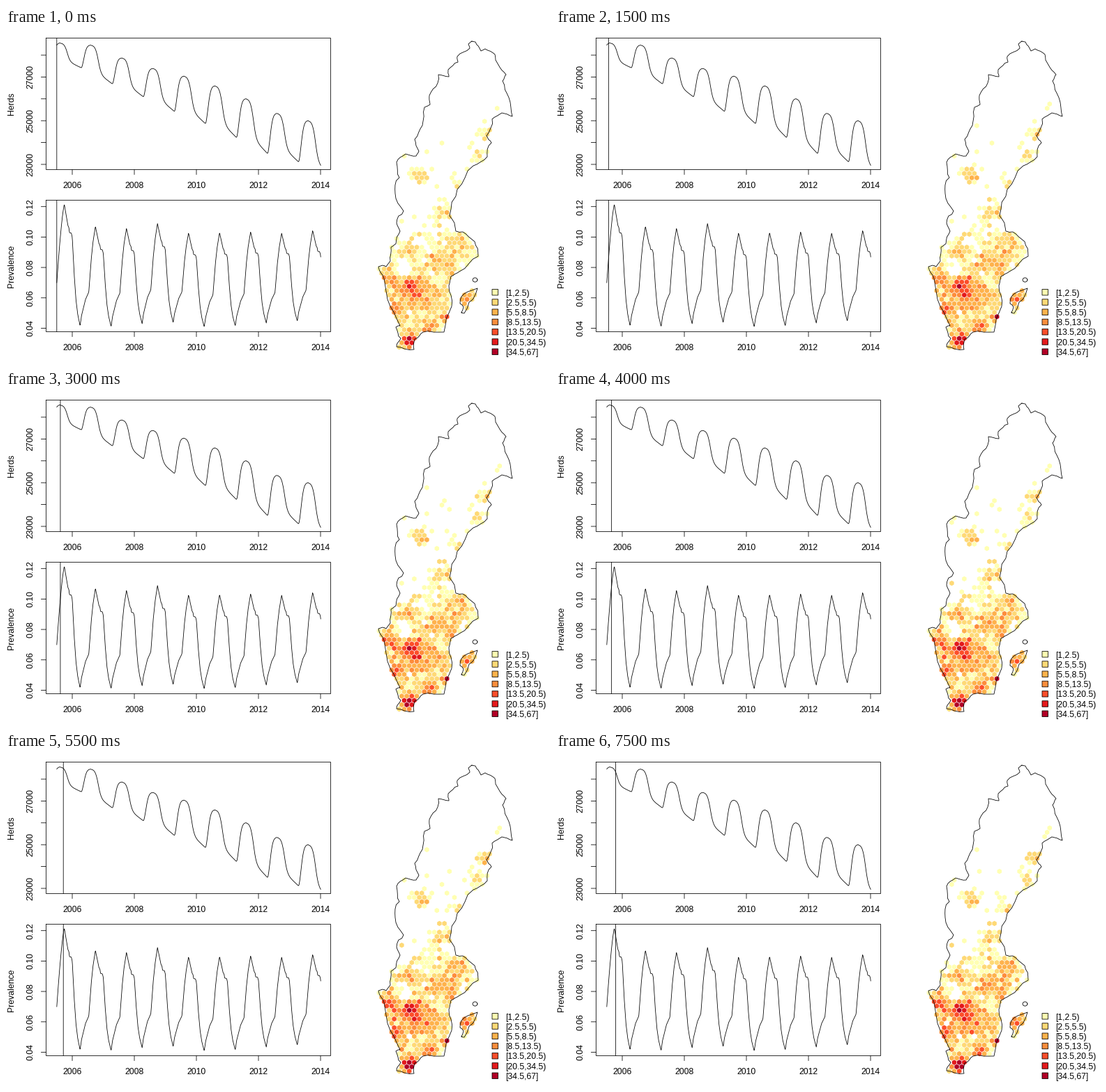
Recreate the animation shown at these times as a matplotlib script. Size 780 by 480 pixels, loop 8000 ms.

```python
import numpy as np
import matplotlib.pyplot as plt
from matplotlib.animation import FuncAnimation
from matplotlib.collections import PolyCollection
from matplotlib.path import Path

plt.rcParams["font.family"] = "Liberation Sans"
PX = 0.72                      # one pixel in points at 100 dpi
FONT = 12.3 * PX
FRAMES = 16
YEAR = 44.5                    # pixels per year
START, END = 72.8, 451
PALETTE = ["none", "#FFFFB2", "#FED976", "#FEB24C", "#FD8D3C",
           "#FC4E2A", "#E31A1C", "#B10026"]

rng = np.random.default_rng(7)
fig = plt.figure(figsize=(7.8, 4.8), dpi=100, facecolor="white")
ax = fig.add_axes([0, 0, 1, 1])
ax.set_xlim(0, 780)
ax.set_ylim(480, 0)
ax.axis("off")


def line(xs, ys, **kw):
    kw = {"color": "black", "lw": 0.8 * PX, "solid_joinstyle": "round",
          "snap": False, **kw}
    return ax.plot(xs, ys, **kw)[0]


def label(x, y, text, **kw):
    kw = {"ha": "center", "va": "center_baseline", **kw}
    ax.text(x, y, text, fontsize=FONT, **kw)


# ---------------------------------------------------------------- charts
def panel(top, bottom, title, ticks):
    line([57.5, 465.5, 465.5, 57.5, 57.5], [top, top, bottom, bottom, top],
         solid_joinstyle="miter")
    for k in range(5):
        x = 95 + 2 * YEAR * k
        line([x, x], [bottom, bottom + 7])
        label(x, bottom + 22, str(2006 + 2 * k))
    for y, text in ticks:
        line([50.5, 57.5], [y, y])
        label(35.5, y, text, rotation=90, va="center")
    label(8, (top + bottom) / 2, title, rotation=90, va="center")


def wave(x, first, peaks, troughs, turn, fall, rise):
    """Yearly wave; fall and rise map days since the peak to a depth of 0..1."""
    year = np.clip((x - first) // YEAR, 0, len(peaks) - 1).astype(int)
    dx = x - first - year * YEAR
    peaks, troughs = np.array(peaks), np.array(troughs)
    upper = np.append(peaks, peaks[-1])[year + (dx > turn)]
    depth = np.where(dx > turn, rise(dx), fall(dx))
    return upper + (troughs[year] - upper) * depth


def herd_fall(dx):
    drop = 1 / (1 + np.exp((10 - dx) / 2.2))
    return 0.72 * drop + 0.28 * np.clip((dx - 9) / 21, 0, 1)


def herd_rise(dx):
    u = np.clip((dx - 30.5) / 14, 0, 1)
    return np.exp(-(u / 0.375) ** 1.8)


def through(*knots):
    xs, ys = zip(*knots)
    return lambda dx: np.interp(dx, xs, ys)


panel(14.5, 203.5, "Herds",
      [(196 - 31.4 * k, "" if k % 2 else str(23000 + 1000 * k)) for k in range(6)])
panel(247.5, 436.5, "Prevalence",
      [(431.5 - 43.7 * k, f"{0.04 + 0.02 * k:.2f}") for k in range(5)])

x = np.arange(START, END + 0.4, 0.4)
herds = wave(x, 77.5, [21.5, 24.5, 43, 58, 69, 83, 101.5, 122.5, 133],
             [57, 80, 98.5, 119.5, 137, 157, 180, 192, 212],
             30.5, herd_fall, herd_rise)
lead = x < 77.5
herds[lead] = 21.5 + 3 * ((77.5 - x[lead]) / 4.7) ** 2
line(x, herds)

prevalence = wave(
    x, 83.7, [254, 285, 288, 281, 294.5, 294, 293, 295, 291],
    [428, 429, 425, 423, 429.5, 428, 424, 421, 421], 22.5,
    through((0, 0), (5, .17), (6.5, .19), (7.3, .23), (10, .235), (11.3, .27),
            (14, .57), (16.5, .78), (19, .9), (22.5, 1)),
    through((22.5, 1), (24.5, .9), (28, .8), (30, .74), (33.2, .69),
            (35, .66), (38.5, .33), (41, .16), (44.5, 0)))
lead = x < 83.7
prevalence[lead] = 254 + 112 * ((83.7 - x[lead]) / 10.9) ** 1.4
line(x, prevalence)

cursors = [line([START] * 2, span)
           for span in ((14.5, 203.5), (247.5, 436.5))]

# ------------------------------------------------------------------- map
west = [(668, 19), (663, 23), (665, 29), (647, 41), (648, 49), (634, 60),
        (635, 70), (620, 67), (619, 79), (607, 97), (608, 110), (600, 114),
        (597, 140), (586, 160), (592, 177), (588, 184), (573, 181),
        (560, 193), (564, 215), (558, 238), (570, 263), (560, 280),
        (565, 292), (559, 310), (552, 315), (551, 335), (545, 343),
        (534, 343), (542, 360), (547, 390), (565, 428), (559, 430),
        (566, 446), (560, 458)]
east = [(585, 462), (586, 447), (598, 437), (628, 437), (639, 400),
        (635, 370), (638, 357), (650, 350), (677, 328), (672, 307),
        (655, 293), (645, 292), (636, 270), (647, 232), (670, 198),
        (690, 185), (696, 165), (689, 155), (697, 131), (711, 122),
        (726, 127), (721, 100), (712, 76), (717, 67), (706, 53),
        (701, 38), (687, 30), (681, 33), (673, 20)]
isle = [(653, 409), (656, 401), (651, 396), (653, 386), (662, 379),
        (676, 374), (670, 389), (664, 394), (657, 410)]


def rough(points, rounds=2, size=0.07):
    """Closed coast with randomly shifted midpoints."""
    pts = np.array(points, float)
    for _ in range(rounds):
        step = np.roll(pts, -1, axis=0) - pts
        side = step[:, ::-1] * [1, -1]
        mid = pts + step / 2 + size * side * rng.standard_normal((len(pts), 1))
        pts = np.stack([pts, mid], axis=1).reshape(-1, 2)
    return np.vstack([pts, pts[:1]])


ring = np.radians(np.arange(0, 360, 45))
islet = np.column_stack([672.5 + 3.5 * np.cos(ring), 362 + 3.2 * np.sin(ring)])
shores = [rough(west + east), rough(isle, 1), rough(islet, 0)]

# Centres of high or low numbers: x, y, radius, strength
spots = [(708, 114, 8, 2.0), (687, 153, 8, 3.2), (674, 182, 9, 2.4),
         (647, 222, 9, 1.6), (597, 213, 8, 3.2), (621, 262, 9, 3),
         (585, 255, 20, -1), (650, 310, 17, 1.7), (622, 335, 13, 1.4),
         (573, 325, 12, 1.5), (573, 347, 8, -4), (607, 353, 6, -1),
         (551, 362, 9, 2.4), (577, 371, 10, 3.8), (590, 358, 6, 1.5),
         (557, 406, 10, 3.2), (598, 385, 14, 2.3), (622, 390, 7, 1),
         (632, 416, 7, 3), (604, 433, 9, 2), (577, 449, 9, 4.4),
         (661, 389, 6, 2.4)]


def hex_grid():
    grid = np.array([(697 + 7.2 * (c + r % 2 / 2), 53 + 6.24 * r)
                     for r in range(-6, 67) for c in range(-24, 6)])
    inside = [Path(s).contains_points(grid) for s in shores[:2]]
    return grid[inside[0] | inside[1]]


def severity(cells):
    cx, cy = cells.T
    field = np.interp(cy, [20, 110, 190, 240, 290, 340, 460],
                      [-2, -1, .2, -.2, .7, 1.6, 1.8])
    for sx, sy, size, strength in spots:
        field += strength * np.exp(-((cx - sx) ** 2 + (cy - sy) ** 2)
                                   / (2 * size ** 2))
    return field


cells = hex_grid()
field = severity(cells) + 0.7 * rng.standard_normal(len(cells))
drift = np.cumsum(0.1 * rng.standard_normal((FRAMES, len(cells))), axis=0)


def colours(i):
    growth = 1 + 0.18 * (1 - np.exp(-i / 3))
    level = np.floor(field * growth + drift[i])
    return [PALETTE[k] for k in np.clip(level, 0, 7).astype(int)]


turn = np.radians(np.arange(30, 390, 60))
corners = 3.75 * np.column_stack([np.cos(turn), np.sin(turn)])
hexes = PolyCollection(cells[:, None, :] + corners, linewidths=0, zorder=1)
ax.add_collection(hexes)
for shore in shores:
    line(*shore.T)

bounds = ["1", "2.5", "5.5", "8.5", "13.5", "20.5", "34.5", "67"]
for k in range(7):
    y = 380 + 14.25 * k
    ax.add_patch(plt.Rectangle((697, y - 4.5), 8.5, 8.5, fc=PALETTE[k + 1],
                               ec="black", lw=0.8 * PX, snap=False))
    close = "]" if k == 6 else ")"
    label(716, y, f"[{bounds[k]},{bounds[k + 1]}{close}", ha="left")


def draw(i):
    hexes.set_facecolor(colours(i))
    now = START + i * YEAR / 52
    for cursor in cursors:
        cursor.set_xdata([now, now])
    return [hexes, *cursors]


anim = FuncAnimation(fig, draw, frames=FRAMES, interval=500, repeat=True,
                     repeat_delay=0)
plt.show()
```
